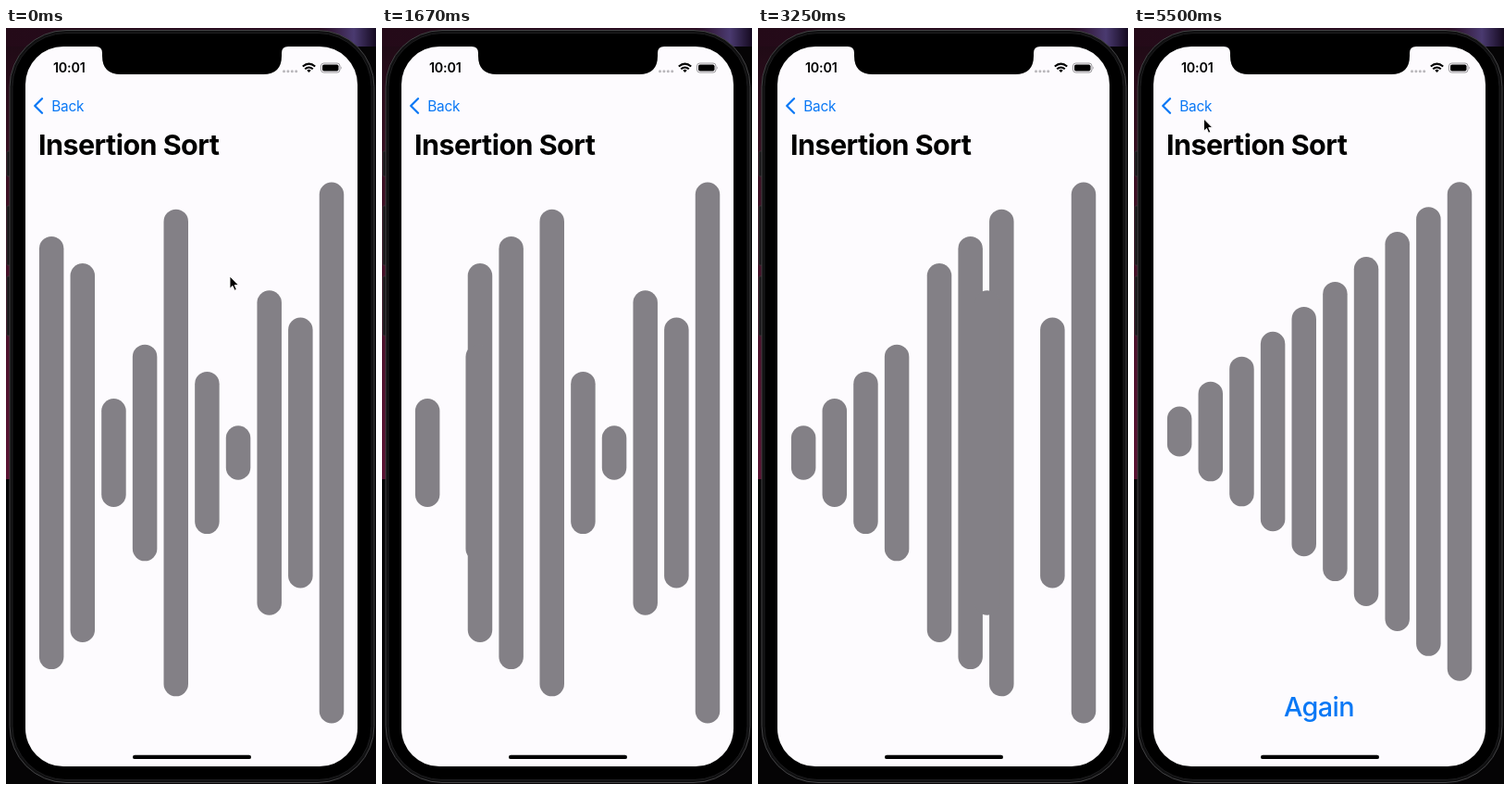
These frames come from a looping animation (400x816 px, 5.58 s). An HTML page:

```html
<!DOCTYPE html>
<html lang="en">
<head>
<meta charset="utf-8">
<title>Insertion Sort</title>
<style>
  html, body { margin: 0; width: 100%; height: 100%; overflow: hidden; background: #000; }
  svg { display: block; width: 100%; height: 100%; }
  text { font-family: Inter, Roboto, sans-serif; }
</style>
</head>
<body>
<svg viewBox="0 0 400 816">
  <defs>
    <linearGradient id="wall" x2="0" y2="1">
      <stop offset="0" stop-color="#1c0a14"/>
      <stop offset=".3" stop-color="#3a0f22"/>
      <stop offset="1" stop-color="#5a1232"/>
    </linearGradient>
    <linearGradient id="glow">
      <stop offset="0" stop-color="#240a18"/>
      <stop offset=".85" stop-color="#2a0c22"/>
      <stop offset=".94" stop-color="#4a3a70"/>
      <stop offset="1" stop-color="#150a20"/>
    </linearGradient>
  </defs>

  <!-- wallpaper and phone -->
  <rect width="400" height="816" fill="#050405"/>
  <rect width="60" height="487" fill="url(#wall)"/>
  <rect width="400" height="20" fill="url(#glow)"/>
  <g fill="#161416" stroke="#3a3538" stroke-width=".8">
    <rect x="1" y="133" width="5" height="27" rx="1"/>
    <rect x="1" y="192" width="5" height="64" rx="1"/>
    <rect x="1" y="268" width="5" height="64" rx="1"/>
  </g>
  <rect x="4" y="2.5" width="394" height="812" rx="61" fill="#101011" stroke="#434345"/>
  <rect x="7" y="5.5" width="388" height="806" rx="58" fill="#000" stroke="#1d1d1f"/>
  <rect x="21" y="20" width="359" height="777" rx="41" fill="#fdfbfe"/>
  <path d="M97 19V20Q104 20 104 27V30Q104 50 124 50H278Q298 50 298 30V27Q298 20 305 20V19Z"/>

  <!-- status bar -->
  <text x="51" y="48" font-size="14.3" font-weight="600" letter-spacing="-.2">10:01</text>
  <g fill="#b9b7bb">
    <circle cx="300.5" cy="46.7" r="1.5"/><circle cx="304.9" cy="46.7" r="1.5"/>
    <circle cx="309.3" cy="46.7" r="1.5"/><circle cx="313.7" cy="46.7" r="1.5"/>
  </g>
  <g fill="none" stroke="#000" stroke-width="2">
    <path d="M320.8 41.6Q327.5 35.6 334.2 41.6M323.2 44.3Q327.5 40.6 331.8 44.3"/>
    <path d="M325.3 45.7Q327.5 44 329.7 45.7L327.5 48Z" fill="#000" stroke="none"/>
  </g>
  <rect x="340.5" y="38" width="20.5" height="10" rx="3" fill="none" stroke="#9a989c"/>
  <rect x="342" y="39.5" width="17.5" height="7" rx="1.8"/>
  <path d="M362 41.3Q363.6 43 362 44.8Z" fill="#9a989c"/>

  <!-- navigation -->
  <path d="M39 76.3L31.2 84L39 91.7" fill="none" stroke="#0a78f5" stroke-width="2.3" stroke-linecap="round" stroke-linejoin="round"/>
  <text x="49.3" y="89.5" font-size="15.4" letter-spacing="-.3" fill="#0a78f5">Back</text>
  <text x="35" y="137.3" font-size="30.5" font-weight="700" letter-spacing="-.55">Insertion Sort</text>

  <g id="bars" fill="#838086"></g>
  <text id="again" x="200" y="743" font-size="28.8" font-weight="500" letter-spacing="-.6" text-anchor="middle" fill="#0a78f5">Again</text>
  <rect x="137" y="784.7" width="128" height="4.4" rx="2.2"/>
  <path id="cursor" d="M0 0V13.2L3 10.4L5.1 15.3L7.3 14.3L5.2 9.6H9.4Z" stroke="#fff" stroke-width=".9"/>
</svg>

<script>
const LOOP = 5580, FPS = 12, DURATION = 350;
const values = [8, 7, 2, 4, 9, 3, 1, 6, 5, 10];
const moveStarts = [395, 895, 1452, 2010, 2556, 3103, 3655];
const AGAIN_START = 4322;
const $ = id => document.getElementById(id);
const clamp = x => Math.min(1, Math.max(0, x));
const mix = (a, b, p) => a + (b - a) * p;

// cubic-bezier(.42, 0, .58, 1), solved by bisection
function easeInOut(x) {
  if (x <= 0 || x >= 1) return clamp(x);
  let lo = 0, hi = 1;
  for (let i = 0; i < 20; i++) {
    const s = (lo + hi) / 2;
    const bx = 1.26 * s * (1 - s) ** 2 + 1.74 * s * s * (1 - s) + s ** 3;
    if (bx < x) lo = s; else hi = s;
  }
  return lo * lo * (3 - 2 * lo);
}
const progress = (t, start) => easeInOut((t - start) / DURATION);

// every order the list passes through while being sorted
const orders = [values];
for (let i = 1; i < values.length; i++) {
  const next = [...orders.at(-1)];
  const [value] = next.splice(i, 1);
  const slot = next.findIndex((v, j) => j >= i || v > value);
  if (slot < 0 || slot === i) continue;
  next.splice(slot, 0, value);
  orders.push(next);
}

const bars = values.map(value => {
  const node = document.createElementNS("http://www.w3.org/2000/svg", "rect");
  node.setAttribute("width", 26.5);
  node.setAttribute("rx", 13.25);
  $("bars").append(node);
  return { value, node };
});

// cursor path: time, x, y
const exitPath = [[500, 242, 268], [750, 440, 250]];
const enterPath = [[5000, 337, 195], [5167, 146, 153], [5250, 146, 153], [5500, 75.5, 98]];
function along(path, t) {
  let i = 0;
  while (i < path.length - 2 && t > path[i + 1][0]) i++;
  const [a, b] = [path[i], path[i + 1]];
  const p = clamp((t - a[0]) / (b[0] - a[0]));
  return [mix(a[1], b[1], p), mix(a[2], b[2], p)];
}

function draw(t) {
  const shrink = progress(t, AGAIN_START);
  const unit = mix(58.4, 53.85, shrink);
  const middle = mix(458.5, 435.5, shrink);
  for (const { value, node } of bars) {
    let slot = values.indexOf(value);
    moveStarts.forEach((start, k) => {
      const shift = orders[k + 1].indexOf(value) - orders[k].indexOf(value);
      slot += shift * progress(t, start);
    });
    node.setAttribute("x", 35.9 + 33.65 * slot);
    node.setAttribute("y", middle - value * unit / 2);
    node.setAttribute("height", value * unit);
  }
  $("again").setAttribute("opacity", shrink);

  const visible = t < 750 || t > 4995;
  const [x, y] = along(t < 2500 ? exitPath : enterPath, t);
  $("cursor").setAttribute("transform", `translate(${x} ${y})`);
  $("cursor").setAttribute("visibility", visible ? "visible" : "hidden");
}

const origin = performance.now();
function tick() {
  const t = (performance.now() - origin) % LOOP;
  draw(Math.floor(t * FPS / 1000 + .05) * 1000 / FPS);
  requestAnimationFrame(tick);
}
tick();
</script>
</body>
</html>
```
